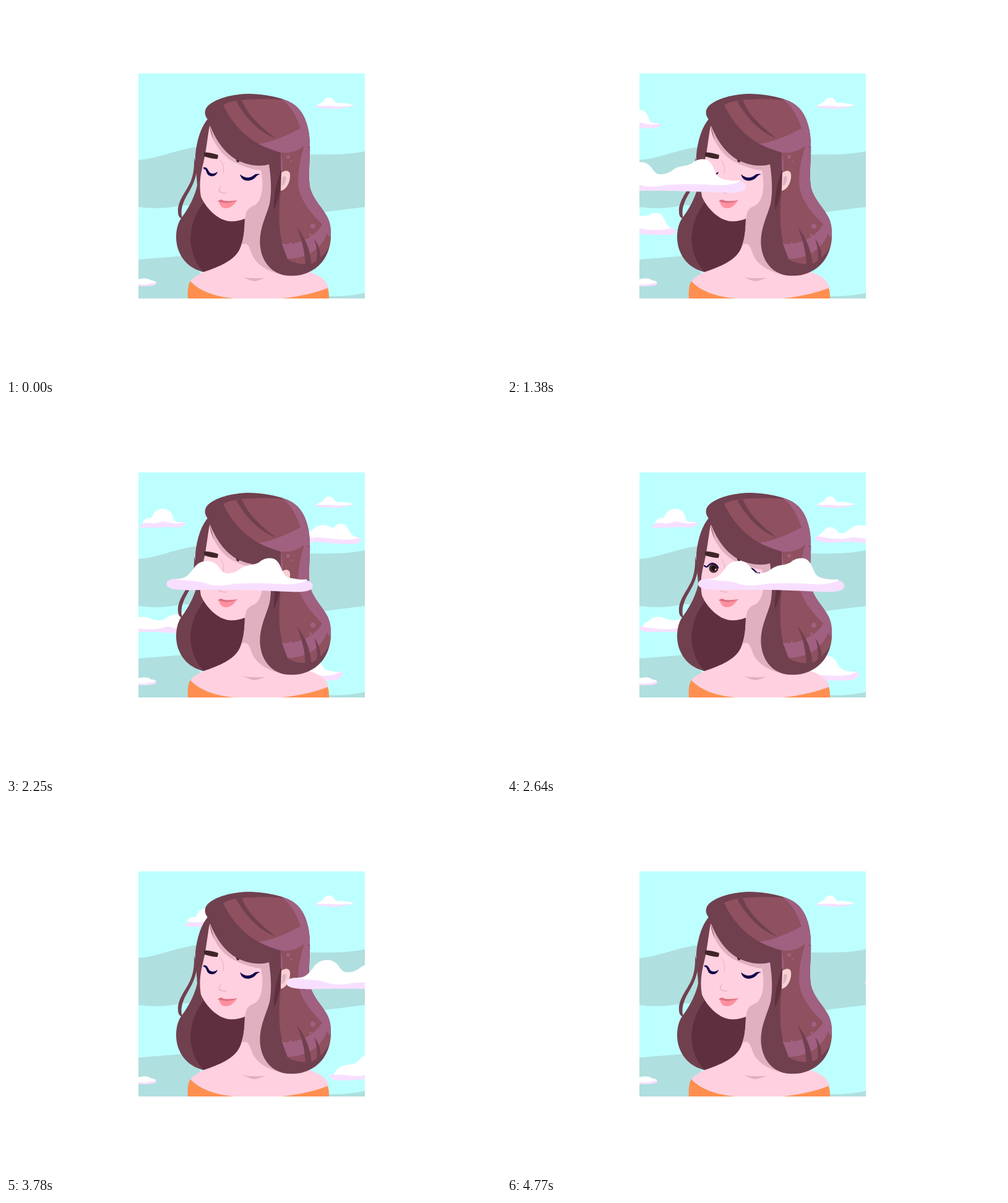
Recreate the animation shown at these times as an HTML page with a canvas. Size 800 by 600 pixels, loop 4800 ms.

```html
<!DOCTYPE html>
<html lang="en">
<head>
<meta charset="utf-8">
<title>Head in the clouds</title>
<style>
html, body { margin: 0; width: 100%; height: 100%; overflow: hidden; background: #fff; }
canvas { display: block; }
</style>
</head>
<body>
<canvas id="stage" width="800" height="600"></canvas>
<script>
const ctx = document.getElementById('stage').getContext('2d');
const LOOP = 4800, STEP = 30;
const EYES_OPEN = 2250, EYES_CLOSE = 3480;

const sky = '#bdffff', hill = '#b0dfdf', cloudShade = '#f8dfff', white = '#fff';
const skin = '#ffd0df', skinShade = '#e0b0c0';
const hair = '#70404f', hairDeep = '#5f2f3f', hairWarm = '#8f505f', hairGlow = '#a06080';
const navy = '#10004a', brow = '#402528', orange = '#ff8f50';

const fillOf = (color, d) => ({ color, path: new Path2D(d) });
const lineOf = (color, width, d) => ({ color, width, path: new Path2D(d) });
const dot = (color, x, y, r) =>
  fillOf(color, `M${x - r} ${y}a${r} ${r} 0 1 0 ${2 * r} 0a${r} ${r} 0 1 0 ${-2 * r} 0Z`);
const cloud = (shade, top) => [fillOf(cloudShade, shade), fillOf(white, top)];

const backdrop = [
  fillOf(sky, 'M214 109H580V473H214Z'),
  fillOf(hill, 'M214 249C245 247 275 232 310 228L490 240C525 241 555 240 580 235V325L516 333L400 330L285 322C262 328 235 328 214 325Z'),
  fillOf(hill, 'M214 410L302 403L330 473H214Z'),
  fillOf(hill, 'M500 467C535 472 562 468 580 464V473H500Z'),
  ...cloud('M499 163C503 160 510 159 516 159L562 160C562 163 553 163 546 165C530 168 512 165 499 163Z',
    'M501 161C505 158 509 158 512 155C515 149 519 148 523 148C530 148 529 156 536 157C545 156 552 158 562 160C552 164 543 161 535 163C520 160 512 163 501 161Z'),
  ...cloud('M214 446L238 444C243 445 244 449 241 451C232 454 223 453 214 453Z',
    'M214 442C220 440 228 440 232 442C235 445 240 444 243 447C233 448 230 452 214 450Z')
];

const body = [
  fillOf(hair, 'M304 245C305 272 299 285 291 298C282 312 277 323 278 333C278 340 281 343 285 344C282 334 284 324 288 315C295 300 306 288 309 262Z'),
  fillOf(hair, 'M333 176C318 188 311 208 307 232C304 252 308 268 309 290C306 305 297 325 284 342C274 355 272 380 280 398C288 417 304 427 322 431L400 380L390 300L345 200Z'),
  fillOf(hairDeep, 'M320 317C308 333 299 350 298 378C300 402 308 420 320 430C345 426 372 412 382 390L392 330L340 300Z'),
  fillOf(skin, 'M386 340C386 365 384 378 379 390C371 412 343 422 320 430C311 434 303 439 298 445C312 461 338 470 369 473H446C480 469 505 463 521 456C519 443 507 436 490 430L430 330Z'),
  fillOf(skinShade, 'M386 340C386 360 384 375 380 387C390 380 393 389 397 400C403 418 425 432 455 436L480 420L440 240L345 195L329 194L360 300Z'),
  fillOf(skinShade, 'M380 438C390 441 410 440 421 440C412 441 408 445 401 445C394 444 390 441 380 438Z'),
  fillOf(skin, 'M329 194C332 217 347 243 372 254C387 261 401 265 412 266C416 285 416 308 405 320C398 325 391 325 388 335L386 344C378 347 370 349 360 348C340 345 322 325 315 308C312 290 314 275 317 262C324 235 325 215 329 194Z'),
  fillOf(orange, 'M298 445C312 461 338 470 369 473H294C293 462 294 451 298 445Z'),
  fillOf(orange, 'M446 473C478 469 503 463 520 456C522 462 522 468 522 473Z')
];

const features = [
  fillOf(brow, 'M320 237C328 236 336 239 343 241L342 247C335 248 327 245 320 243Z'),
  fillOf(brow, 'M371 246L378 249L376 253L373 252Z'),
  lineOf(skinShade, 1, 'M346 249C351 255 353 262 351 270'),
  lineOf(skinShade, 1.3, 'M347 292C344 297 343 301 348 301C351 303 354 303 356 302'),
  fillOf('#ff8f9f', 'M344 317C354 321 365 319 374 314C368 322 362 328 355 327C349 327 346 323 344 317Z'),
  fillOf('#de7080', 'M342 316C345 313 348 312 352 315C360 316 368 315 374 314C366 319 354 321 342 316Z')
];

const closedEyes = [
  fillOf(navy, 'M319 261C324 260 326 264 328 268C331 272 337 272 342 268C340 275 333 277 328 274C323 271 325 264 319 263Z'),
  fillOf(navy, 'M378 272C387 280 395 278 400 274C403 271 407 271 411 272C407 273 406 274 404 276C398 284 385 285 380 277Z')
];

const iris = (x, y) => [
  dot('#4c302c', x, y, 7.6), dot('#1e1018', x, y, 4), dot('#f5dbe6', x + 3, y + 2, 1.2)
];
const openEyes = [
  fillOf('#ffe8f0', 'M325 262C329 255 339 255 342 264C341 274 329 275 325 262Z'),
  ...iris(334, 264),
  lineOf(navy, 2.3, 'M319 260C322 263 324 262 326 259C331 254 338 256 341 263'),
  fillOf('#ffe8f0', 'M379 272C383 263 397 261 402 271C399 281 384 283 379 272Z'),
  ...iris(391, 271),
  lineOf(navy, 2.3, 'M378 275C379 262 395 260 402 270C404 273 406 273 408 272')
];

const frontHair = [
  fillOf(hair, 'M325 182C320 175 321 168 325 163C337 150 365 142 395 142C420 143 437 147 450 151.5C468 157 478 170 483 182C489 197 491 210 491 226C492 245 488 270 491 292C496 314 514 328 521 345C528 365 527 395 510 415C495 432 475 438 455 436C430 434 414 414 411 390C408 362 420 342 426 320C430 300 428 275 425 256C412 260 395 259 375 250C352 238 338 214 330 194Z'),
  fillOf(hairGlow, 'M447 151C468 157 478 170 483 182C489 197 491 210 491 226C492 245 488 270 491 292C496 314 514 328 521 345C525 354 526 366 524 376C510 398 485 412 455 409L446 385L444 237C430 233 418 228 408 223Z'),
  fillOf(hairWarm, 'M351 160C360 155 370 153 381 152C405 150 430 150 447 152C462 163 470 180 476 198C455 209 430 220 408 223C384 210 362 185 351 160Z'),
  fillOf(hair, 'M372 154L381 152C390 175 410 195 436 214C410 205 388 182 372 154Z'),
  fillOf(hairWarm, 'M444 237C460 239 472 234 482 226C475 250 470 270 473 295C478 318 495 337 511 353C500 373 475 386 447 385C441 365 440 330 444 300C447 276 449 258 444 237Z'),
  fillOf(hairWarm, 'M455 409C485 409 510 393 519 368L524 376C526 391 511 407 496 416C482 419 465 417 455 409Z'),
  fillOf(hair, 'M470 358C486 378 493 398 494 424L484 426C484 400 479 380 470 358Z'),
  fillOf(hair, 'M498 377C507 388 509 400 508 411L502 414C504 400 502 388 498 377Z'),
  fillOf(hairDeep, 'M445 264C445 290 442 312 433 330C432 308 437 285 445 264Z'),
  dot(hairGlow, 456, 244, 3), dot(hairGlow, 461, 251, 1.5),
  dot(hairGlow, 496, 356, 4.3), dot(hairGlow, 492, 370, 2), dot(hairGlow, 460, 384, 2),
  lineOf(hair, 1, 'M488 228L491 229'),
  fillOf('#f8cfd2', 'M445 270C450 265 458 265 459 272C460 282 455 296 444 299Z'),
  fillOf(skinShade, 'M447 277C451 273 454 276 452 282C451 286 449 290 446 291Z')
];

// Each cloud drifts at a steady speed: left edge = x + speed * time.
const drifting = [
  { x: 110, speed: 0.047, from: 0, parts: cloud(
    'M0 197C3 192 10 190 18 188H60L73 190C76 194 70 197 60 198C40 196 20 200 0 198Z',
    'M5 191C7 185 11 182 17 183C21 183 21 176 26 172C34 166 45 167 50 173C55 178 54 185 57 188C62 190 68 189 72 190C58 194 48 190 37 188C26 194 16 190 5 191Z') },
  { x: 56.7, speed: 0.0596, from: 0, parts: cloud(
    'M0 361C2 356 10 357 20 354H110L130 360C137 364 135 370 122 370C90 372 60 365 30 367C10 368 -1 366 0 361Z',
    'M5 359C8 352 14 350 20 345C28 341 36 342 44 346C55 349 60 349 66 346C74 339 84 338 90 339C95 333 103 335 108 336C117 340 117 358 128 359C110 364 85 363 70 358C50 366 30 362 5 359Z') },
  { x: 110, speed: 0.147, from: 1500, parts: cloud(
    'M0 216C0 211 6 210 20 211H110L130 214C136 219 133 224 120 225C85 225 60 220 40 222C20 224 2 222 0 216Z',
    'M4 212C10 210 14 199 22 198C32 195 34 205 40 207C50 210 55 198 66 195C76 192 82 196 88 200C94 190 104 190 110 197C117 206 117 213 130 215C110 222 80 214 60 214C40 219 20 216 4 212Z') },
  { x: 280.8, speed: 0.0641, from: 1000, parts: cloud(
    'M0 442C2 436 10 434 20 433H95L117 431C121 436 118 441 108 445C80 447 60 444 45 446C25 448 3 448 0 442Z',
    'M6 438C10 432 14 424 24 423C32 420 34 422 40 420C48 418 50 405 64 405C78 405 82 414 86 421C90 430 102 431 115 432C95 442 75 436 60 437C45 444 25 436 6 438Z') }
];
const bigCloud = { x: -25.2, speed: 0.1266, from: 0, parts: cloud(
  'M0 289C0 283 8 281 16 281L60 278H190L220 283C232 283 237 288 236 294C235 301 222 303 200 302C150 300 110 298 60 299C30 300 3 300 0 291Z',
  'M14 282C30 282 36 274 43 265C51 253 62 251 72 253C83 256 85 265 91 270C99 275 112 271 120 264C131 257 142 260 150 254C158 247 168 247 174 249C184 254 185 268 191 275C200 283 215 283 226 282C232 284 210 291 190 290C160 288 140 288 110 289C90 293 75 293 62 288C48 283 35 285 14 282Z') };

function paint(shapes) {
  for (const { color, width, path } of shapes) {
    if (width) {
      ctx.strokeStyle = color;
      ctx.lineWidth = width;
      ctx.stroke(path);
    } else {
      ctx.fillStyle = color;
      ctx.fill(path);
    }
  }
}

function paintCloud({ x, speed, from, parts }, time) {
  if (time < from) return;
  ctx.save();
  ctx.translate(x + speed * time, 0);
  paint(parts);
  ctx.restore();
}

function draw(time) {
  ctx.clearRect(0, 0, 800, 600);
  ctx.save();
  ctx.beginPath();
  ctx.rect(214, 109, 366, 364);
  ctx.clip();
  ctx.lineCap = 'round';
  paint(backdrop);
  drifting.forEach(c => paintCloud(c, time));
  paint(body);
  paint(features);
  paint(time >= EYES_OPEN && time < EYES_CLOSE ? openEyes : closedEyes);
  paint(frontHair);
  paintCloud(bigCloud, time);
  ctx.restore();
}

const start = performance.now();
function tick() {
  const time = (performance.now() - start) % LOOP;
  draw(Math.floor(time / STEP) * STEP);
  requestAnimationFrame(tick);
}
tick();
</script>
</body>
</html>
```
